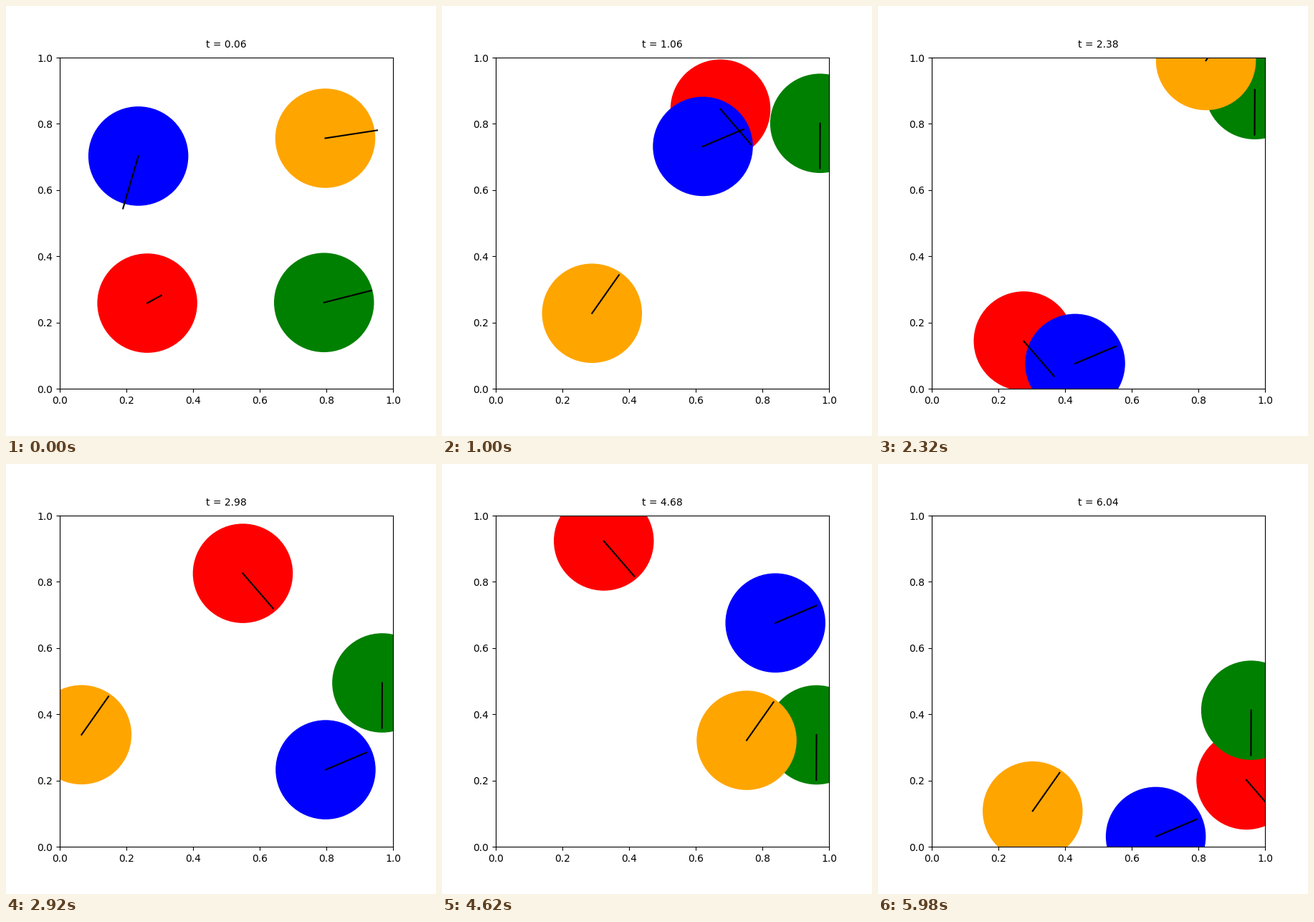
Animation of 600 by 600 pixels, one loop 6 s. Source, as a matplotlib script:

```python
import numpy as np
import matplotlib.pyplot as plt
from matplotlib.animation import FuncAnimation
from matplotlib.patches import Circle

FRAMES, STEP, START = 300, 0.02, 0.06
RADIUS, ARROW = 0.15, 0.2

COLORS = ["red", "blue", "green", "orange"]
RED, BLUE, GREEN, ORANGE = range(4)

# Free flight after the last hit: position = ORIGIN + SPEED * t
ORIGIN = np.array([[0.1911, 0.4070], [-0.0278, 0.4553],
                   [0.9765, 0.5229], [-0.1398, 0.6148]])
SPEED = np.array([[0.4558, -0.5307], [0.6126, 0.2608],
                  [-0.0030, -0.6806], [0.4044, 0.5783]])


def undo_hit(origin, speed, disc):
    """Step back over the elastic hit of blue and disc; also give its time."""
    gap = origin[BLUE] - origin[disc]
    gap -= np.round(gap)  # nearest periodic image
    rel = speed[BLUE] - speed[disc]
    a, b, c = rel @ rel, gap @ rel, gap @ gap - (2 * RADIUS) ** 2
    t = (-b + np.sqrt(b * b - a * c)) / a
    normal = (gap + rel * t) / (2 * RADIUS)
    kick = (rel @ normal) * normal
    origin, speed = origin.copy(), speed.copy()
    for i, k in ((BLUE, kick), (disc, -kick)):
        speed[i] -= k
        origin[i] += k * t
    return t, origin, speed


# Flight legs, latest first, each with the time it begins
legs = []
origin, speed = ORIGIN, SPEED
for disc in (GREEN, ORANGE, RED):
    t, before, slower = undo_hit(origin, speed, disc)
    legs.append((t, origin, speed))
    origin, speed = before, slower
legs.append((0, origin, speed))


def state(t):
    """Positions on the periodic unit square and velocities at time t."""
    _, p, v = next(leg for leg in legs if t >= leg[0])
    return (p + v * t) % 1, v


plt.rcParams["font.family"] = "DejaVu Sans"
fig, ax = plt.subplots(figsize=(6, 6), dpi=100)
fig.subplots_adjust(left=0.125, right=0.9, bottom=0.11, top=0.88)
ax.set(xlim=(0, 1), ylim=(0, 1))

label = ax.text(0.5, 1.03, "", ha="center", transform=ax.transAxes)
discs = [ax.add_patch(Circle((0, 0), RADIUS, fc=c, lw=0)) for c in COLORS]
pins = [ax.plot([], [], color="black", lw=1.5)[0] for _ in COLORS]


def draw(frame):
    t = START + STEP * frame
    label.set_text(f"t = {t:.2f}")
    for disc, pin, p, v in zip(discs, pins, *state(t)):
        disc.center = p
        tip = p + ARROW * v
        pin.set_data([p[0], tip[0]], [p[1], tip[1]])
    return [label, *discs, *pins]


anim = FuncAnimation(fig, draw, frames=FRAMES, interval=20, repeat=True)
plt.show()
```
